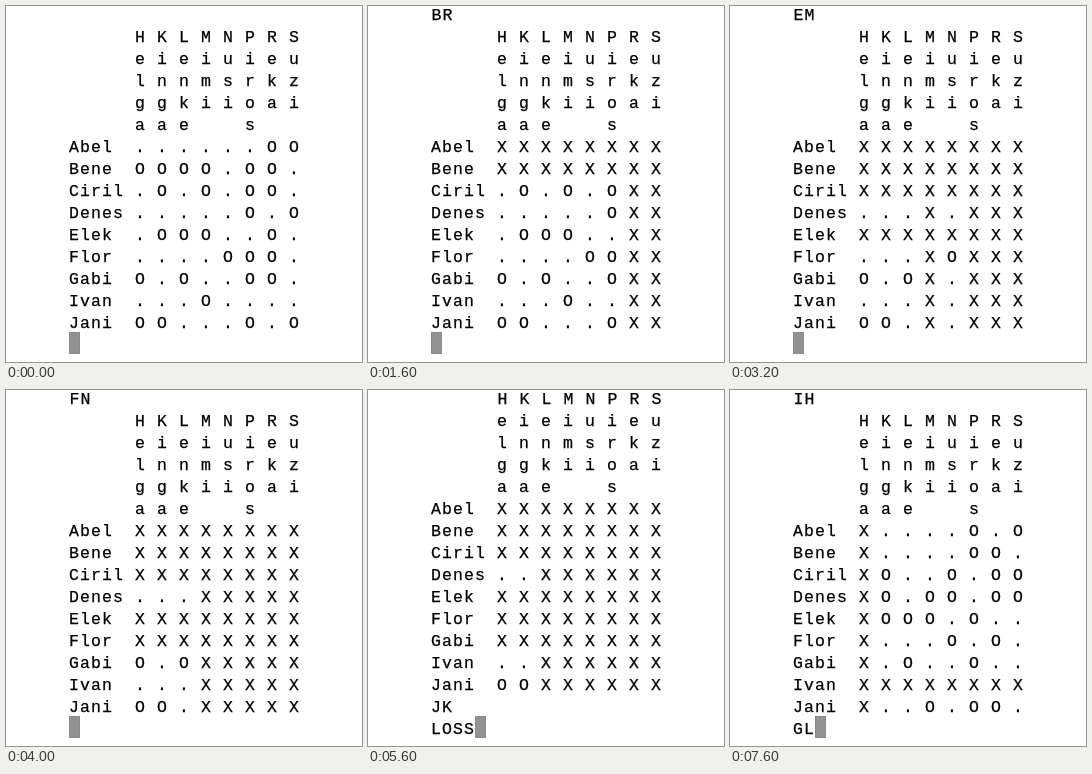
These frames come from a looping animation (356x356 px, 8 s). An HTML page:

```html
<!DOCTYPE html>
<html lang="hu">
<head>
<meta charset="utf-8">
<style>
  html, body { margin: 0; width: 100%; height: 100%; overflow: hidden; background: #fff; }
  pre, #cursor { position: absolute; margin: 0; }
  pre {
    left: 63px; top: -1px; width: 235px; height: 357px; overflow: hidden;
    font: 16.5px/22px "Liberation Mono", monospace; letter-spacing: 1.098px;
    text-indent: .4px; color: #000; -webkit-text-stroke: .25px #000;
  }
  #cursor {
    top: 326px; width: 11px; height: 22px; box-sizing: border-box;
    background: #929292; border: 1px solid #8a8a8a;
  }
</style>
</head>
<body>
<pre id="screen"></pre>
<div id="cursor"></div>
<script>
const STEP = 400, STEPS = 20;
const rows = ["Abel", "Bene", "Ciril", "Denes", "Elek", "Flor", "Gabi", "Ivan", "Jani"];
const cols = ["Helga", "Kinga", "Lenke", "Mimi", "Nusi", "Piros", "Reka", "Suzi"];

const first = {
  title: "",
  moves: ["AS", "BR", "CP", "EM", "FN", "GL", "JK"],
  cells: ["......OO", "OOOO.OO.", ".O.O.OO.", ".....O.O", ".OOO..O.",
          "....OOO.", "O.O..OO.", "...O....", "OO...O.O"]
};
const second = {
  title: "=".repeat(22),
  moves: ["IH", "GL"],
  cells: ["O....O.O", ".....OO.", "OO..O.OO", ".O.OO.OO", "OOOO.O..",
          "O...O.O.", "..O..O..", "O.......", "O..O.OO."]
};

const line = (name, marks) => name.padEnd(6) + marks.join(" ");

// Every played move crosses out its row and its column.
function board(game, played) {
  const gone = game.moves.slice(0, played).join("");
  const header = [0, 1, 2, 3, 4].map(i => line("", cols.map(c => c[i] || " ")));
  const body = rows.map((name, r) => line(name, cols.map((c, i) =>
    gone.includes(name[0]) || gone.includes(c[0]) ? "X" : game.cells[r][i])));
  return [...header, ...body];
}

function view(step) {
  if (step === 14 || step === 15) return [...board(first, 6), "JK", "LOSS"];
  const game = step < 16 ? first : second;
  const turn = step < 16 ? step : step - 16;
  const played = turn >> 1;
  const title = played ? game.moves[played - 1] : game.title;
  return [title, ...board(game, played), turn % 2 ? game.moves[played] : ""];
}

const screenEl = document.getElementById("screen");
const cursorEl = document.getElementById("cursor");
let shown = -1;

function draw(now) {
  const step = Math.floor(now / STEP) % STEPS;
  if (step !== shown) {
    shown = step;
    const lines = view(step);
    screenEl.textContent = lines.join("\n");
    cursorEl.style.left = 63 + 11 * lines[lines.length - 1].length + "px";
  }
  requestAnimationFrame(() => draw(performance.now() - start));
}
const start = performance.now();
draw(0);
</script>
</body>
</html>
```
